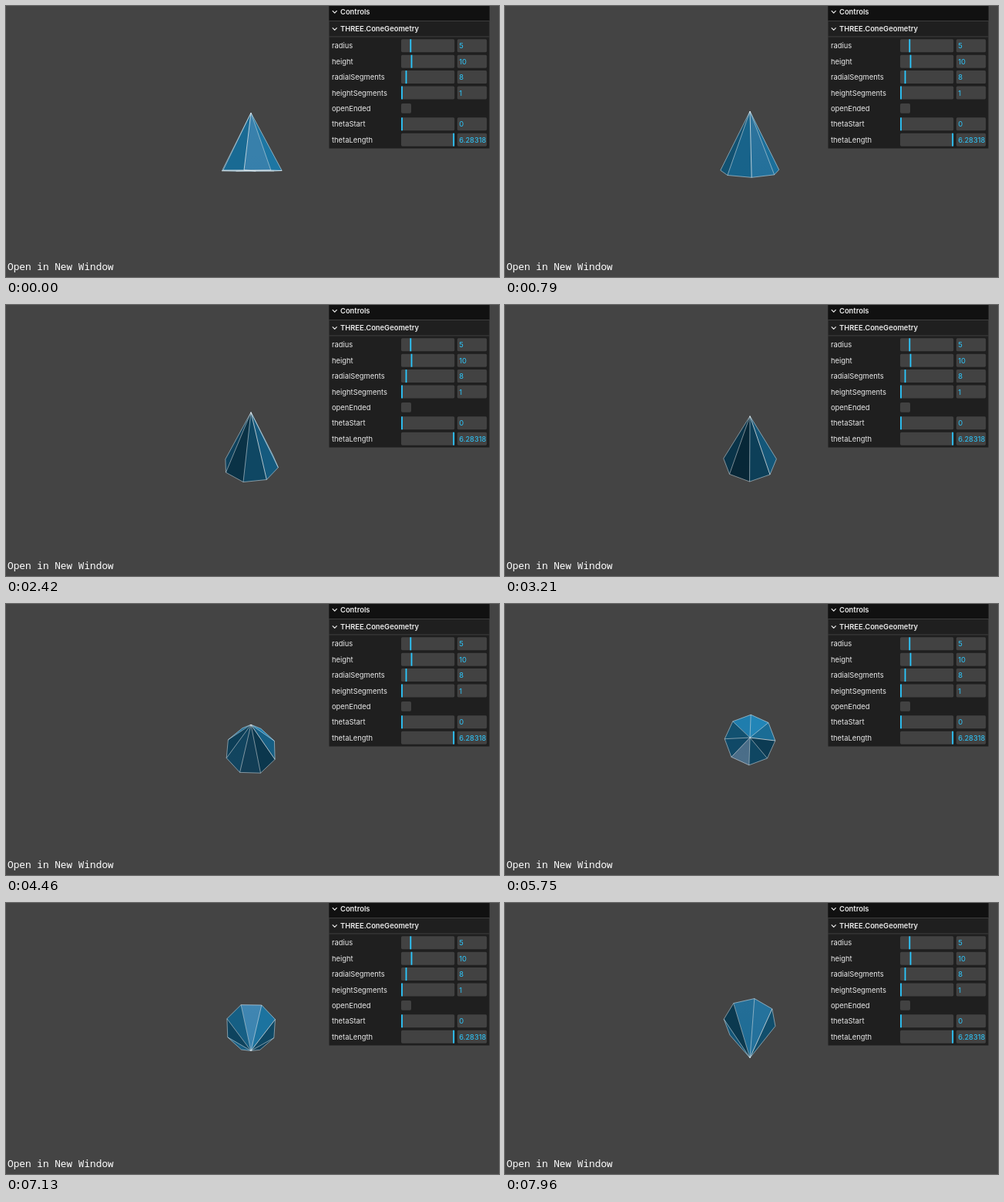
An HTML page with a canvas for the animation above (8000 ms loop, 640 by 353 pixels).

```html
<!DOCTYPE html>
<html lang="en">
<head>
<meta charset="utf-8">
<title>Cone geometry</title>
<style>
  html, body { margin: 0; width: 100%; height: 100%; overflow: hidden; background: #444; }
  canvas { display: block; width: 640px; height: 353px; }
</style>
</head>
<body>
<canvas id="stage" width="640" height="353"></canvas>
<script>
const ctx = document.getElementById('stage').getContext('2d');
const LOOP = 8000;
const CX = 318, CY = 175.7, FOCAL = 230, CAMERA = [0, 0, 30];
const RADIUS = 5, HALF = 5, SEGMENTS = 8;
const START = -0.19, SPEED = 0.3; // radians, radians per second

// Vectors
const dot = (a, b) => a[0] * b[0] + a[1] * b[1] + a[2] * b[2];
const sub = (a, b) => a.map((v, i) => v - b[i]);
const add = (a, b) => a.map((v, i) => v + b[i]);
const mix = (a, b, k) => a.map((v, i) => v + (b[i] - v) * k);
const unit = a => { const l = Math.hypot(...a); return a.map(v => v / l); };
const cross = (a, b) => [
  a[1] * b[2] - a[2] * b[1],
  a[2] * b[0] - a[0] * b[2],
  a[0] * b[1] - a[1] * b[0]
];

function project([x, y, z]) {
  const s = FOCAL / (CAMERA[2] - z);
  return [CX + x * s, CY - y * s];
}

// Phong material under three directional lights
const toLinear = c => c <= 0.04045 ? c / 12.92 : ((c + 0.055) / 1.055) ** 2.4;
const toSrgb = c => c <= 0.0031308 ? c * 12.92 : 1.055 * c ** (1 / 2.4) - 0.055;
const rgb = hex => [hex >> 16, hex >> 8 & 255, hex & 255].map(v => toLinear(v / 255));
const DIFFUSE = rgb(0x156289), EMISSIVE = rgb(0x072534), SPECULAR = rgb(0x111111)[0];
const LIGHTS = [[0, 1, 0], [1, 2, 1], [-1, -2, -1]].map(unit);
const INTENSITY = 3, SHININESS = 30;

function shade(point, normal) {
  const view = unit(sub(CAMERA, point));
  let matte = 0, gloss = 0;
  for (const light of LIGHTS) {
    const nl = dot(normal, light);
    if (nl <= 0) continue;
    const h = unit(add(light, view));
    const vh = Math.max(0, dot(view, h)), nh = Math.max(0, dot(normal, h));
    const fresnel = 2 ** ((-5.55473 * vh - 6.98316) * vh);
    const f = SPECULAR * (1 - fresnel) + fresnel;
    matte += INTENSITY * nl / Math.PI;
    gloss += INTENSITY * nl * f * 0.25 * (SHININESS / 2 + 1) / Math.PI * nh ** SHININESS;
  }
  const out = DIFFUSE.map((d, i) =>
    Math.round(255 * Math.min(1, toSrgb(EMISSIVE[i] + d * matte + gloss))));
  return `rgb(${out})`;
}

// Spin about the own axis, then tilt towards the camera
function place(theta, r, y, angle) {
  const x = r * Math.sin(theta + angle), z = r * Math.cos(theta + angle);
  const c = Math.cos(angle), s = Math.sin(angle);
  return [x, y * c - z * s, y * s + z * c];
}

function fillFace(points, normal, from, to) {
  const a = project(from), b = project(to);
  const paint = ctx.createLinearGradient(...a, ...b);
  for (let k = 0; k <= 1; k += 0.25) paint.addColorStop(k, shade(mix(from, to, k), normal));
  ctx.fillStyle = ctx.strokeStyle = paint;
  ctx.lineWidth = 0.4;
  ctx.beginPath();
  points.forEach(p => ctx.lineTo(...project(p)));
  ctx.closePath();
  ctx.fill();
  ctx.stroke();
}

function drawEdge(a, b, alpha = 0.5) {
  ctx.strokeStyle = `rgba(255,255,255,${alpha})`;
  ctx.lineWidth = 0.9;
  ctx.beginPath();
  ctx.moveTo(...project(a));
  ctx.lineTo(...project(b));
  ctx.stroke();
}

function drawCone(angle) {
  const apex = place(0, 0, HALF, angle), foot = place(0, 0, -HALF, angle);
  const rim = Array.from({ length: SEGMENTS }, (_, i) =>
    place(i * 2 * Math.PI / SEGMENTS, RADIUS, -HALF, angle));
  const next = i => (i + 1) % SEGMENTS;

  const down = unit(sub(foot, apex));
  const capSeen = dot(down, sub(CAMERA, foot)) > 0;
  if (capSeen) fillFace(rim, down, rim[0], rim[SEGMENTS / 2]);

  const seen = rim.map((p, i) => {
    const q = rim[next(i)];
    const normal = unit(cross(sub(p, apex), sub(q, apex)));
    const visible = dot(normal, sub(CAMERA, apex)) > 0;
    if (visible) fillFace([apex, p, q], normal, apex, mix(p, q, 0.5));
    return visible;
  });

  rim.forEach((p, i) => {
    const before = (i + SEGMENTS - 1) % SEGMENTS;
    // The seam edge is doubled, so it shows brighter
    if (seen[i] || seen[before]) drawEdge(apex, p, i ? 0.5 : 0.75);
    if (seen[i] || capSeen) drawEdge(p, rim[next(i)]);
    if (capSeen) drawEdge(foot, p);
  });
}

// Control panel
const UI = 'Inter, Roboto, sans-serif';
const ROWS = [
  ['radius', 525.3, '5'],
  ['height', 526.5, '10'],
  ['radialSegments', 519.5, '8'],
  ['heightSegments', 514, '1'],
  ['openEnded'],
  ['thetaStart', 514, '0'],
  ['thetaLength', 581.2, '6.28318']
];

function rect(x, y, w, h, color) {
  ctx.fillStyle = color;
  ctx.fillRect(x, y, w, h);
}

function box(x, y, w, h) {
  ctx.fillStyle = '#424242';
  ctx.beginPath();
  ctx.roundRect(x, y, w, h, 1.7);
  ctx.fill();
}

function text(str, x, y, font, color = '#ebebeb') {
  ctx.font = font;
  ctx.fillStyle = color;
  ctx.fillText(str, x, y);
}

function heading(str, y) {
  ctx.strokeStyle = '#ebebeb';
  ctx.lineWidth = 1.2;
  ctx.beginPath();
  ctx.moveTo(423.8, y - 1.4);
  ctx.lineTo(426.7, y + 1.6);
  ctx.lineTo(429.6, y - 1.4);
  ctx.stroke();
  text(str, 434, y + 3.6, `600 9.4px ${UI}`);
}

function drawPanel() {
  rect(419.5, 0, 208, 185.5, '#1f1f1f');
  rect(419.5, 0, 208, 19, '#111');
  rect(419.5, 19, 208, 0.9, '#424242');
  rect(419.5, 39.5, 208, 0.9, '#424242');
  heading('Controls', 7.6);
  heading('THREE.ConeGeometry', 29.8);

  ROWS.forEach(([label, knob, value], i) => {
    const y = 51.8 + i * 20.4;
    text(label, 423, y + 3.5, `9.4px ${UI}`);
    if (!value) return box(513, y - 6.4, 13, 12.8);
    box(513, y - 8.5, 69.3, 17);
    rect(knob - 0.9, y - 8.5, 1.8, 17, '#2cc9ff');
    box(585.8, y - 8.5, 38.4, 17);
    ctx.save();
    ctx.beginPath();
    ctx.rect(585.8, y - 8.5, 38.4, 17);
    ctx.clip();
    text(value, 588.2, y + 3.5, `9.4px ${UI}`, '#2cc9ff');
    ctx.restore();
  });
}

function draw() {
  const seconds = performance.now() % LOOP / 1000;
  rect(0, 0, 640, 353, '#444');
  ctx.lineJoin = 'round';
  drawCone(START + SPEED * seconds);
  drawPanel();
  text('Open in New Window', 2, 344, '12.75px "Noto Sans Mono", "DejaVu Sans Mono", monospace', '#fff');
  requestAnimationFrame(draw);
}
draw();
</script>
</body>
</html>
```
